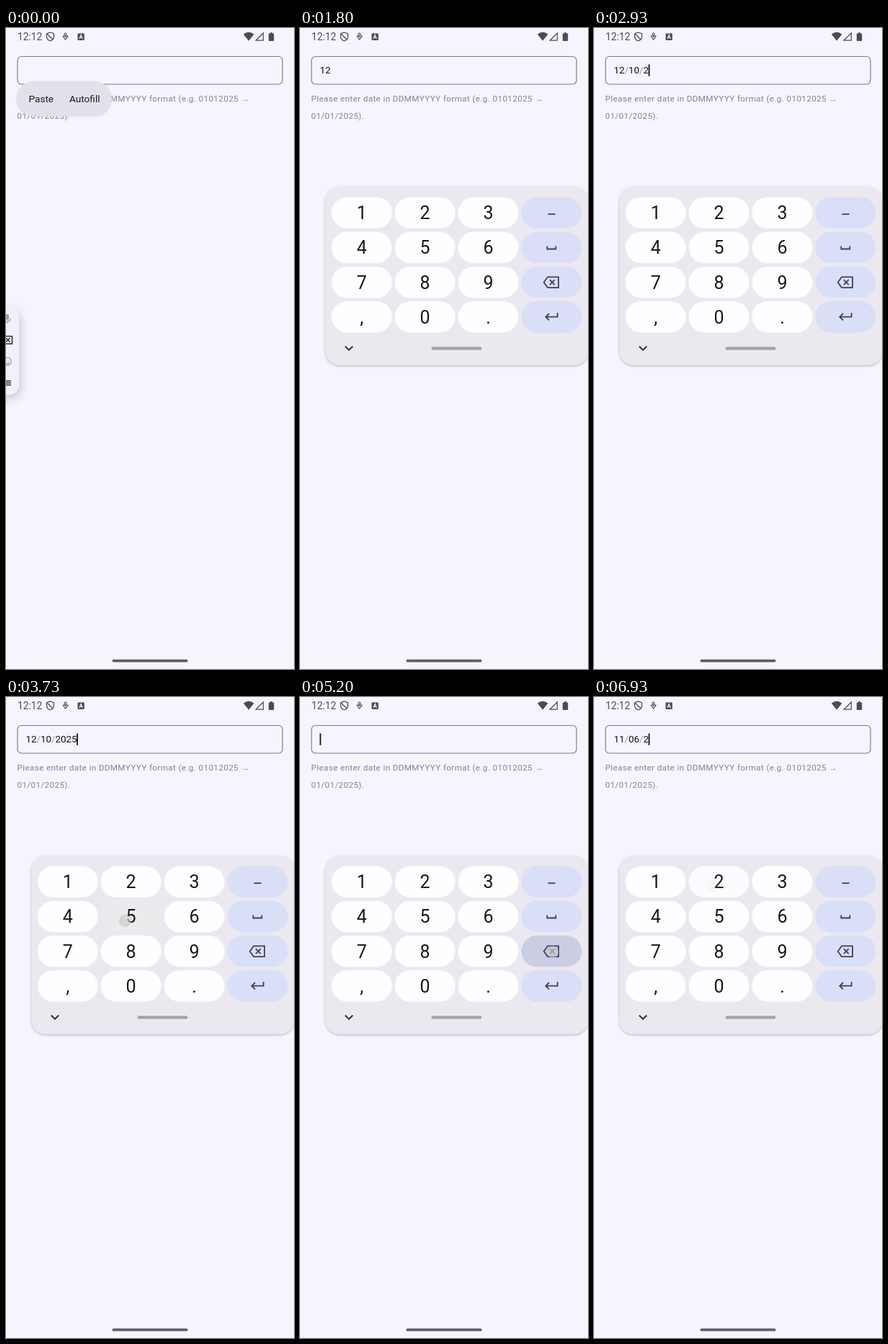
Recreate the animation shown at these times as an HTML page. Size 400 by 889 pixels, loop 7 s.

```html
<!DOCTYPE html>
<html lang="en">
<head>
<meta charset="utf-8">
<title>Date input</title>
<style>
  html, body { margin: 0; width: 100%; height: 100%; overflow: hidden; background: #f7f4fe; }
  svg { display: block; width: 100vw; height: 100vh; font-family: Roboto, sans-serif; }
  .hint { font-size: 11.65px; letter-spacing: .39px; fill: #85828a; }
  .arrow { font-family: "Liberation Sans", sans-serif; }
  .menu { font-size: 13.6px; fill: #1c1b20; }
  .value { font-size: 13.35px; fill: #111014; }
  .value .slash { fill: #a09da5; }
  .digit { font-size: 25px; fill: #18171b; text-anchor: middle; }
  .line { fill: none; stroke-width: 1.8; }
</style>
</head>
<body>
<svg viewBox="0 0 400 889">
  <defs>
    <filter id="wide" x="-100%" y="-50%" width="300%" height="200%">
      <feDropShadow dx="2" dy="5" stdDeviation="7" flood-color="#000" flood-opacity=".2"/>
    </filter>
    <filter id="low" x="-10%" y="-10%" width="120%" height="120%">
      <feDropShadow dx="0" dy="1.3" stdDeviation="1.5" flood-color="#000" flood-opacity=".28"/>
    </filter>
    <filter id="soft" x="-10%" y="-20%" width="120%" height="140%">
      <feDropShadow dx="0" dy=".5" stdDeviation=".8" flood-color="#000" flood-opacity=".1"/>
    </filter>
  </defs>
  <rect width="400" height="889" fill="#f7f4fe"/>

  <!-- status bar -->
  <g fill="#4d4a52" stroke="#4d4a52" stroke-width="0">
    <text x="16" y="16.7" font-size="13.8">12:12</text>
    <path class="line" stroke-width="1.3" style="stroke-width:1.3" d="M61.5 6l5 1.9v4c0 3-2 5-5 6.1-3-1.1-5-3.100-5-6.100v-4zM57.500 8.500l7.500 7.500"/>
    <path class="line" style="stroke-width:1.2" d="M79 11.500l3.500 4.500 3.500-4.500q-2-1.500-3.500.8-1.500-2.300-3.500-.8"/>
    <circle cx="82.500" cy="8.500" r="1.500" fill="none" style="stroke-width:1.1"/>
    <rect x="99.500" y="7.500" width="9.300" height="9.500" rx="1"/>
    <path class="line" style="stroke:#fff;stroke-width:1.1" d="M102 15l2.150-5.500 2.150 5.500M102.800 13.300h2.700"/>
    <path d="M329.800 8.800q7.300-6.200 14.600 0l-7.300 9z"/>
    <path class="line" style="stroke-width:1.2" d="M357.300 7v10.200h-10.300z"/>
    <path d="M367 6.200h3v1.200h1.300q.9 0 .9.900v8.700q0 .9-.9.900h-5.600q-.9 0-.9-.9v-8.700q0-.9.900-.9h1.300z"/>
  </g>

  <!-- date field -->
  <rect x="16" y="39.500" width="368" height="38.500" rx="5.500" fill="none" stroke="#7d7a83" stroke-width="1.150"/>
  <text id="value" class="value" x="27.400" y="63.400"></text>
  <rect id="cursor" y="50.500" width="1.800" height="16.300" fill="#111014"/>
  <text class="hint" x="15.500" y="102.300">Please enter date in DDMMYYYY format (e.g. 01012025 <tspan class="arrow">→</tspan></text>
  <text class="hint" x="15.500" y="125.600">01/01/2025).</text>
  <g id="popup">
    <rect x="14.300" y="74" width="132.700" height="48.300" rx="24" fill="#e2e0e8" filter="url(#soft)"/>
    <text class="menu" x="31.500" y="103">Paste</text>
    <text class="menu" x="88" y="103">Autofill</text>
  </g>

  <!-- collapsed keyboard toolbar -->
  <g id="toolbar">
    <rect x="-40" y="387" width="58" height="121.500" rx="14" fill="#f3f0f9" filter="url(#wide)"/>
    <g class="line" stroke="#a19ea7" style="stroke-width:1.300">
      <path d="M-2 403q0 4 4 4t4-4M2 407v2.500"/>
      <rect x=".5" y="397.500" width="3" height="7" rx="1.500" fill="#a19ea7"/>
      <circle cx="2" cy="462.500" r="5.300"/>
      <path d="M-.5 464q2.500 3.500 5 0M0 460.500v1M4 460.500v1"/>
    </g>
    <path class="line" stroke="#2b2930" style="stroke-width:1.500" d="M-5 427.500h13.500v10.500h-13.500M0 430l5.500 5.500M5.500 430l-5.500 5.500M-5 489.500h12M-5 492.300h12M-5 495.100h12"/>
  </g>

  <g id="keyboard">
    <rect x="35" y="220" width="365.500" height="247.500" rx="20" fill="#ebe8f0" filter="url(#low)"/>
    <g id="keys"></g>
    <path class="line" stroke="#2f2d35" style="stroke-width:2" d="M62.800 441.500l5.200 5.200 5.200-5.200"/>
    <rect x="182.500" y="442.300" width="70" height="4.200" rx="2.100" fill="#a5a2aa"/>
    <circle id="touch" r="8" fill="#c9c9ce" fill-opacity=".65" stroke="#a5a5ad" stroke-opacity=".3"/>
  </g>
  <rect x="147.500" y="875.800" width="105" height="3.700" rx="1.850" fill="#605d66"/>
</svg>

<script>
const LOOP = 7000;
const $ = id => document.getElementById(id);
const clamp = v => Math.max(0, Math.min(1, v));

const ICONS = {
  dash: 'M344.500 258.200h10',
  space: 'M343.300 302.500v4h12v-4',
  back: 'M344 345.300h15v14.800h-15l-5.300-7.400zM346.800 349.200l7 7M353.800 349.200l-7 7',
  enter: 'M357.600 395v5.700h-16M346 396l-4.700 4.700 4.700 4.700'
};
const ROWS = [['1', '2', '3', 'dash'], ['4', '5', '6', 'space'], ['7', '8', '9', 'back'], [',', '0', '.', 'enter']];

// Build the key grid.
const centers = {};
let markup = '';
ROWS.forEach((row, r) => row.forEach((name, c) => {
  const x = 43.700 + c * 87.900, y = 234.500 + r * 48.150;
  const box = `x="${x}" y="${y}" width="84" height="43.500" rx="21.700"`;
  centers[name] = [x + 42, y + 21.700];
  markup += `<rect ${box} fill="${ICONS[name] ? '#d9dff7' : '#fefdff'}"/>` +
    `<rect id="tint-${name}" ${box} fill="#000" opacity="0"/>` +
    (ICONS[name]
      ? `<path class="line" stroke="#3d4257" d="${ICONS[name]}"/>`
      : `<text class="digit" x="${x + 42}" y="${y + 30.700}">${name}</text>`);
}));
$('keys').innerHTML = markup;

// Each press: key, finger down, finger up.
const tap = (key, up) => ({ key, down: up - 130, up });
const firstDate = [['1', 1330], ['2', 1530], ['1', 2270], ['0', 2530], ['2', 2800], ['0', 3200], ['2', 3470], ['5', 3730]];
const secondDate = [['1', 5870], ['1', 6070], ['0', 6320], ['6', 6600], ['2', 6870]];
const deletions = [4330, 4470, 4570, 4670, 4770, 4860, 4960, 5060];
const presses = [
  ...firstDate.map(([key, at]) => tap(key, at)),
  { key: 'back', down: 4230, up: 5260 },
  ...secondDate.map(([key, at]) => tap(key, at))
];

// Every change of the raw digits, starting when the field takes focus.
const edits = [{ at: 200, digits: '' }];
const edit = (at, change) => edits.push({ at, digits: change(edits.at(-1).digits) });
firstDate.forEach(([key, at]) => edit(at, d => d + key));
deletions.forEach(at => edit(at, d => d.slice(0, -1)));
secondDate.forEach(([key, at]) => edit(at, d => d + key));

function format(d) {
  return d.slice(0, 2) + (d.length > 2 ? '/' : '') + d.slice(2, 4) + (d.length > 3 ? '/' : '') + d.slice(4);
}

function drawField(t) {
  const last = edits.findLast(e => e.at <= t);
  const text = last ? format(last.digits) : '';
  const value = $('value');
  if (value.textContent !== text) {
    value.innerHTML = text.replaceAll('/', '<tspan class="slash">/</tspan>');
  }
  const idle = last ? t - last.at : 0;
  const lit = last && (idle < 270 || Math.floor((idle - 270) / 200) % 2 === 1);
  $('cursor').setAttribute('x', 27.400 + (text ? value.getComputedTextLength() - .3 : 0));
  $('cursor').setAttribute('opacity', lit ? 1 : 0);
}

function drawPresses(t) {
  const levels = {};
  let touchLevel = 0;
  for (const { key, down, up } of presses) {
    const level = Math.min(clamp((t - down) / 60), clamp((up + 70 - t) / 70));
    levels[key] = Math.max(levels[key] || 0, level);
    if (level > touchLevel) {
      touchLevel = level;
      const [dx, dy] = key === 'back' ? [1.500, 1] : [-8, 6];
      $('touch').setAttribute('cx', centers[key][0] + dx);
      $('touch').setAttribute('cy', centers[key][1] + dy);
    }
  }
  for (const key in levels) $('tint-' + key).setAttribute('opacity', levels[key] * .075);
  $('touch').setAttribute('opacity', touchLevel);
}

function draw(now) {
  const t = now % LOOP;
  $('popup').setAttribute('opacity', t < 1330 ? 1 : 0);
  $('toolbar').setAttribute('opacity', 1 - clamp((t - 70) / 130));
  $('keyboard').setAttribute('opacity', clamp((t - 100) / 200));
  drawField(t);
  drawPresses(t);
}

const start = performance.now();
function tick() {
  draw(performance.now() - start);
  requestAnimationFrame(tick);
}
tick();
</script>
</body>
</html>
```
